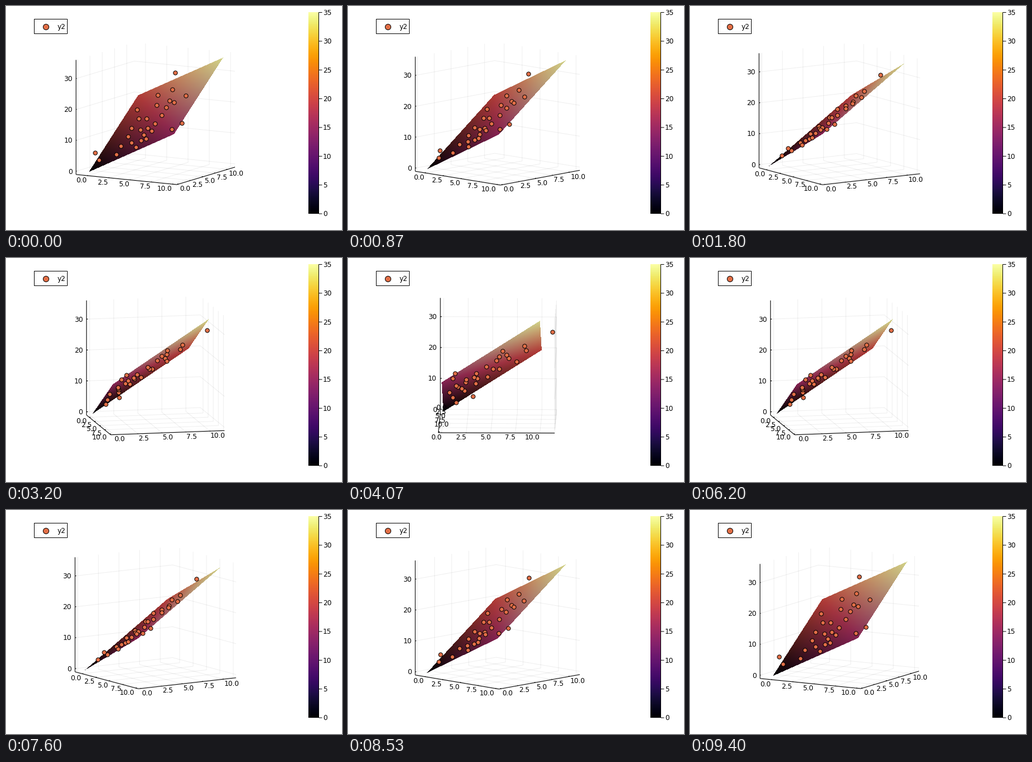
A matplotlib script for the animation above (9.47 s loop, 600 by 400 pixels).

```python
import numpy as np
import matplotlib.pyplot as plt
from matplotlib.animation import FuncAnimation
from matplotlib.collections import LineCollection
from matplotlib.patches import Rectangle

W, H, DPI = 600, 400, 100
FRAMES = 142
INTERVAL = 66.66                  # 15 frames a second
PT = 72 / DPI                     # points per pixel
CENTER = np.array([267.0, 192.0])
SIDE = 207.8                      # edge of the cube in pixels
ELEV = np.radians(10)
LOW = np.array([-1.32, -0.335, -1.05])
SPAN = np.array([11.84, 11.84, 37.1])
ORANGE = "#e36f47"
SHADE = 0.83
LABEL_GAP = 7.5
FONT_SIZE, HALF_DIGIT = 8.7, 4.4
INFERNO = plt.get_cmap("inferno")


def plane(x, y):
    return 1.5 * x + 2 * y


def scatter_points():
    """Samples on the plane: four loose columns and some outliers."""
    rng = np.random.default_rng(4)
    columns = [(2.5, 1.0, 5.7, 5), (3.95, 1.9, 6.7, 4),
               (5.08, 0.7, 3.2, 4), (5.8, 1.4, 6.5, 6)]
    outliers = [(3.7, 11.15), (5, 8.3), (3.2, 8.45), (7.8, 6.15), (6.65, 5.8),
                (1.35, 7.45), (10.17, 1.35), (9.1, 1.1), (0.45, 1.3), (-1, 3)]
    xy = [(x + rng.uniform(-0.15, 0.15), y)
          for x, start, stop, count in columns
          for y in np.linspace(start, stop, count)]
    x, y = np.array(xy + outliers).T
    return np.stack([x, y, plane(x, y)], axis=-1)


def to_unit(points):
    return (points - LOW) / SPAN - 0.5


POINTS = to_unit(scatter_points())
XY_TICKS = np.arange(0, 10.1, 2.5)
Z_TICKS = np.arange(0, 31, 10)
UX, UY, _ = to_unit(XY_TICKS[:, None]).T
UZ = to_unit(Z_TICKS[:, None])[:, 2]
LO, HI, TICK = -0.5, 0.5, 0.012

GRID = ([[(u, LO, LO), (u, HI, LO), (u, HI, HI)] for u in UX]
        + [[(HI, u, LO), (LO, u, LO), (LO, u, HI)] for u in UY]
        + [[(LO, LO, u), (LO, HI, u), (HI, HI, u)] for u in UZ])
X_POS = [(u, LO, LO) for u in UX]
Y_POS = [(HI, u, LO) for u in UY]
Z_POS = [(LO, LO, u) for u in UZ]
EDGES = [[(LO, LO, HI), (LO, LO, LO)],
         [(LO, LO, LO), (HI, LO, LO)],
         [(HI, LO, LO), (HI, HI, LO)]]
TICKS = ([[p, (p[0], LO + TICK, LO)] for p in X_POS]
         + [[p, (HI - TICK, p[1], LO)] for p in Y_POS]
         + [[p, (LO, LO + TICK, p[2])] for p in Z_POS])


def project(points, azimuth):
    a, b, c = np.moveaxis(np.asarray(points, float), -1, 0)
    cos, sin = np.cos(azimuth), np.sin(azimuth)
    x = a * cos + b * sin
    y = (a * sin - b * cos) * np.sin(ELEV) - c * np.cos(ELEV)
    return CENTER + SIDE * np.stack([x, y], axis=-1)


# The plane on [0, 10] x [0, 10], as two shaded triangles
CORNERS = to_unit(np.array([(x, y, plane(x, y))
                            for x, y in ((0, 0), (10, 0), (0, 10))]))
C00, C10, C01, C11 = (np.array(INFERNO(z / 35)[:3]) * SHADE
                      for z in (0, 15, 20, 35))
X0, X1, Y0, Y1 = 95, 435, 60, 340
PIX_X, PIX_Y = np.meshgrid(np.arange(X0, X1) + 0.5, np.arange(Y0, Y1) + 0.5)


def plane_image(azimuth):
    origin, px, py = project(CORNERS, azimuth)
    u, v = px - origin, py - origin
    det = u[0] * v[1] - u[1] * v[0]
    dx, dy = PIX_X - origin[0], PIX_Y - origin[1]
    s = (dx * v[1] - dy * v[0]) / det
    t = (u[0] * dy - u[1] * dx) / det
    inside = (s >= 0) & (s <= 1) & (t >= 0) & (t <= 1)
    s, t = s[..., None], t[..., None]
    near = C00 + s * (C10 - C00) + t * (C01 - C00)
    far = C11 + (1 - s) * (C01 - C11) + (1 - t) * (C10 - C11)
    rgba = np.zeros(PIX_X.shape + (4,))
    rgba[..., :3] = np.clip(np.where(s + t <= 1, near, far), 0, 1)
    rgba[..., 3] = inside
    return rgba


fig = plt.figure(figsize=(W / DPI, H / DPI), dpi=DPI, facecolor="white")
ax = fig.add_axes([0, 0, 1, 1])
ax.axis("off")


def text(x, y, label, ha="left"):
    return ax.text(x, y + HALF_DIGIT, label, ha=ha, va="baseline",
                   fontsize=FONT_SIZE, family="DejaVu Sans", color="black",
                   zorder=6)


def lines(width, color, zorder):
    item = LineCollection([], linewidths=width * PT, colors=color,
                          zorder=zorder, snap=False)
    ax.add_collection(item)
    return item


def dots(diameter, zorder):
    return ax.plot([], [], "o", ms=diameter * PT, mfc=ORANGE, mec="black",
                   mew=PT, zorder=zorder, snap=False)[0]


# Legend
ax.add_patch(Rectangle((50.5, 23.5), 59, 26, fc="white", ec="black", lw=PT,
                       snap=False))
dots(10.2, 5).set_data([71], [36.6])
text(91.3, 36.8, "y2")

# Colour bar
BAR_TOP, BAR_BOTTOM, BAR_LEFT, BAR_RIGHT = 11.5, 371, 540, 558.5
ax.imshow(np.linspace(1, 0, 256)[:, None], cmap=INFERNO, aspect="auto",
          extent=(BAR_LEFT, BAR_RIGHT, BAR_BOTTOM, BAR_TOP),
          interpolation="nearest")
bar_lines = [[(BAR_RIGHT, BAR_TOP), (BAR_RIGHT, BAR_BOTTOM)]]
for value in range(0, 36, 5):
    y = BAR_BOTTOM + (BAR_TOP - BAR_BOTTOM) * value / 35
    bar_lines.append([(BAR_RIGHT, y), (BAR_RIGHT + 6, y)])
    text(566, y, str(value))
lines(1, "black", 3).set_segments(bar_lines)

# Moving parts
grid = lines(1, (0, 0, 0, 0.065), 1)
frame_lines = lines(1.1, "black", 2)
surface = ax.imshow(np.zeros(PIX_X.shape + (4,)), extent=(X0, X1, Y1, Y0),
                    aspect="auto", interpolation="nearest", zorder=3)
scatter = dots(7.3, 4)
x_labels = [text(0, 0, f"{v:.1f}") for v in XY_TICKS]
y_labels = [text(0, 0, f"{v:.1f}") for v in XY_TICKS]
z_labels = [text(0, 0, f"{v:.0f}", "right") for v in Z_TICKS]
ax.set_xlim(0, W)
ax.set_ylim(H, 0)


def place(labels, positions, shift, ha):
    for label, (x, y) in zip(labels, positions + shift):
        label.set_position((x, y + HALF_DIGIT))
        label.set_ha(ha)


def outward(positions):
    """Offset across an axis, to its outer side."""
    dx, dy = positions[-1] - positions[0]
    return LABEL_GAP * np.array([-dy, dx]) / np.hypot(dx, dy)


def update(i):
    # one degree per frame, there and back
    degrees = 30 + min(i, FRAMES - 1 - i)
    az = np.radians(degrees)
    grid.set_segments([project(s, az) for s in GRID])
    frame_lines.set_segments([project(s, az) for s in EDGES + TICKS])
    surface.set_data(plane_image(az))
    scatter.set_data(*project(POINTS, az).T)

    xs, ys, zs = (project(p, az) for p in (X_POS, Y_POS, Z_POS))
    turned = degrees > 90
    lift = np.array([0, -12.7 if turned else 0])
    place(x_labels, xs, outward(xs) + lift, "left" if turned else "right")
    place(y_labels, ys, outward(ys), "right" if turned else "left")
    place(z_labels, zs, np.array([-LABEL_GAP + 1, 0]), "right")
    return []


anim = FuncAnimation(fig, update, frames=FRAMES, interval=INTERVAL,
                     init_func=lambda: [], repeat=True, repeat_delay=0)
plt.show()
```
